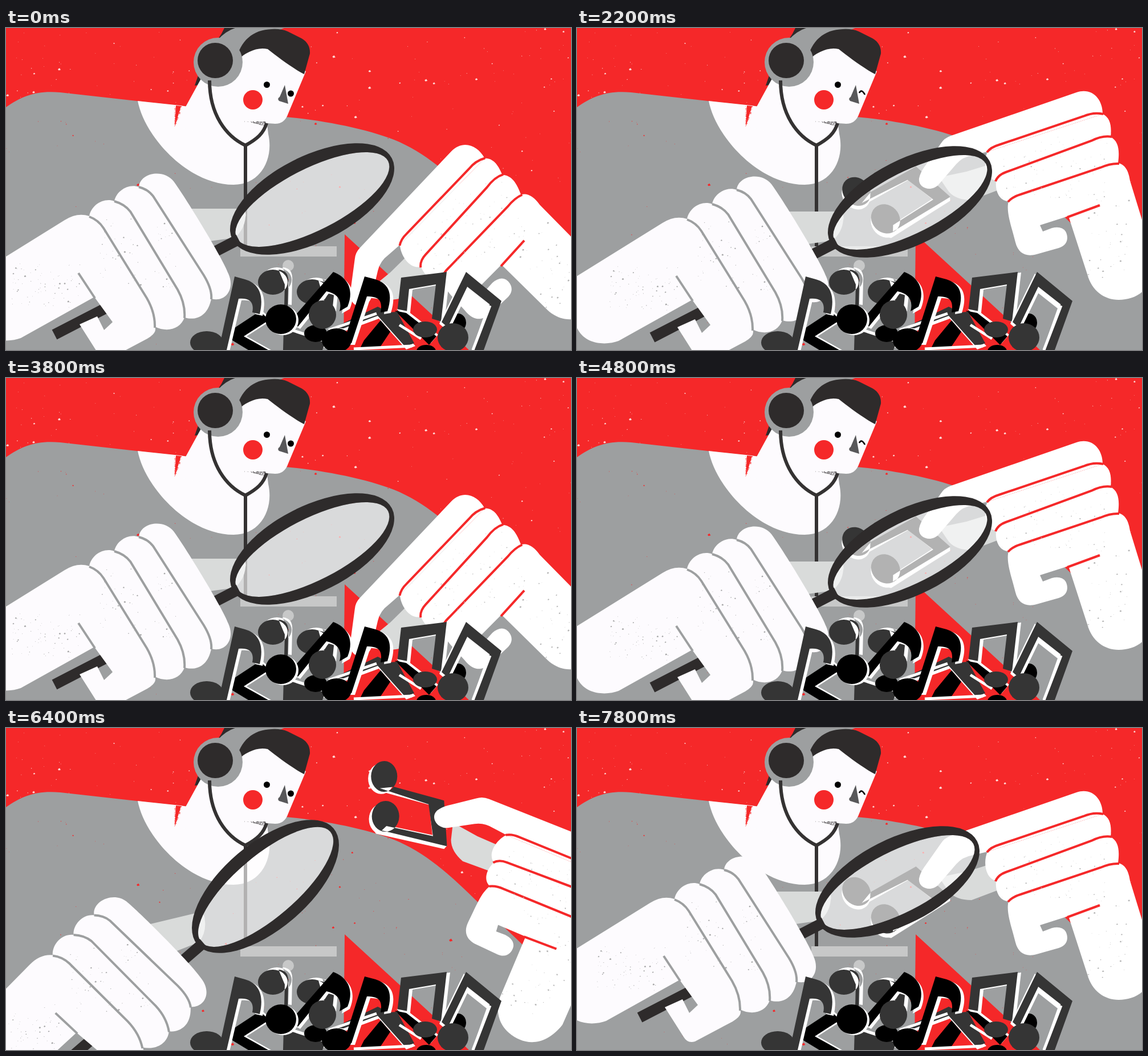
These frames come from a looping animation (991 px wide and 565 px high, 8 s). An HTML page:

```html
<!DOCTYPE html>
<html lang="en">
<head>
<meta charset="utf-8">
<title>Sorting the notes</title>
<style>
  html, body { margin: 0; width: 100%; height: 100%; overflow: hidden; background: #f52829; }
  svg { display: block; width: 100vw; height: 100vh; }
</style>
</head>
<body>
<svg viewBox="0 0 991 565" preserveAspectRatio="none">
  <rect width="991" height="565" fill="#f52829"/>
  <g id="bgDust"></g>

  <!-- body -->
  <path fill="#9d9fa0" d="M0 139C28 119 55 109 95 113L310 137L490 156C565 163 640 179 690 200C742 224 780 259 826 304L991 461V565H0Z"/>
  <g id="bodyDust"></g>
  <path fill="#f52829" d="M594 362L757 512L812 565H592Z"/>
  <path fill="#c7c8c8" d="M411 383H580V401H411Z"/>
  <circle cx="495" cy="417" r="10" fill="#c7c8c8"/>

  <!-- neck and head -->
  <path fill="#fdfbfe" d="M231 128C243 190 318 275 399 275C447 275 470 229 460 186L457 160L306 136Z"/>
  <path fill="#f52829" d="M298 136L307 137L296 173Z"/>
  <g id="neckDust"></g>
  <path fill="#2e2b2b" d="M331 101L345 60L378 10L383 0H420L385 75L347 99Z"/>
  <path fill="#fdfbfe" d="M296 173L347 80L400 30L460 30L526 76L495 150Q489 168 472 168L412 164L380 190Z"/>
  <path fill="#9d9fa0" d="M371 21Q386 5 402 0H488L440 20L410 55Z"/>
  <path fill="#2e2b2b" d="M403 58C411 22 433 3 466 2Q482 1 494 6L518 18Q534 27 533 45L523 81C505 72 478 52 459 37C440 33 422 42 403 58Z"/>
  <circle cx="372" cy="60" r="43" fill="#9d9fa0"/>
  <circle cx="367" cy="57" r="31" fill="#2e2b2b"/>
  <g id="chinDust"></g>
  <circle cx="433" cy="126" r="17" fill="#f52829"/>
  <circle cx="457.500" cy="99.500" r="5.500"/>
  <path fill="#58585a" d="M489 100L495 133L479 128Q475 124 480 121Z"/>
  <circle id="eye" cx="499.500" cy="115" r="5.500"/>
  <path id="wink" d="M495 114Q499 106 505 117" fill="none" stroke="#000" stroke-width="2.500"/>
  <path fill="none" stroke="#343232" stroke-width="6" d="M357 92C357 152 386 190 420 206C440 195 452 185 457 167M420 205V383"/>

  <!-- right hand with its note -->
  <g id="hand">
    <g id="note"></g>
    <path fill="#d9dbda" d="M635 262L683 252L722 240L745 282L692 302Q665 302 652 287Z"/>
    <path fill="#fff" d="M720 217C712 235 716 264 735 268C733 291 744 304 757 304C752 322 762 348 769 376C774 396 788 402 806 397L845 386C862 381 862 366 857 357Q850 347 833 351L817 357L812 346L862 330L895 432C903 462 926 477 950 477C985 477 1014 455 1012 405L970 268Q966 240 949 237C952 214 950 199 936 191C938 171 935 157 922 151Z"/>
    <path fill="#fff" d="M634 275C622 288 598 282 600 264Q602 253 612 240L638 203Q644 193 656 189L876 113C903 104 922 124 922 151L720 217L695 223Q676 226 665 239Z"/>
    <g fill="none" stroke="#f52829" stroke-width="4">
      <path d="M719 218Q726 209 740 205L888 155Q906 147 923 151"/>
      <path d="M734 269Q738 258 752 253L902 198Q922 188 938 191"/>
      <path d="M756 305Q764 296 778 292L918 245Q936 237 951 238"/>
      <path d="M860 332L917 311"/>
    </g>
    <g id="handDust"></g>
  </g>

  <!-- magnifier and left hand -->
  <g id="mag">
    <path fill="#d9dbda" d="M322 317H414Q423 323 420 332Q418 354 401 368L358 374Z"/>
    <ellipse cx="537" cy="301" rx="149" ry="54" transform="rotate(-27 537 301)" fill="#fff" opacity=".62"/>
    <path d="M85 538L408 371" stroke="#2e2b2b" stroke-width="19"/>
    <path id="ring" fill="#2e2b2b" fill-rule="evenodd" transform="rotate(-27 537 300)"/>
    <path fill="#fdfbfe" d="M103 337L-50 432C-76 450 -60 500 -45 525C-30 551 5 552 26 544L155 472L187 516L172 530L160 506L129 520L162 572Q169 584 182 580L248 545Q266 534 261 524C283 535 306 528 313 508C337 515 355 502 360 475C386 482 402 457 390 431C380 403 312 293 294 269C276 246 235 254 233 279C215 272 193 286 190 304C172 297 150 310 146 330Q125 323 103 337Z"/>
    <g fill="none" stroke="#9d9fa0" stroke-width="4">
      <path d="M146 331Q162 337 171 351L247 474Q262 500 261 526"/>
      <path d="M190 304Q208 309 218 322L301 459Q315 484 313 509"/>
      <path d="M233 279Q249 283 258 295L347 434Q362 459 360 476"/>
      <path d="M127 430L156 474"/>
    </g>
    <g id="fistDust"></g>
  </g>

  <g id="pile"></g>
</svg>
<script>
const $ = id => document.getElementById(id);
const INK = '#353535', BLACK = '#000';

// Seeded specks inside a box
function dust(id, seed, n, color, [x, y, w, h], max, keep = () => true) {
  const rnd = () => (seed = (seed * 16807) % 2147483647) / 2147483647;
  let d = '';
  for (let i = 0; i < n; i++) {
    const u = rnd(), v = rnd(), r = 0.4 + max * rnd() ** 5;
    if (keep(u, v)) d += `M${(x + u * w).toFixed(1)} ${(y + v * h).toFixed(1)}l${(r * 1.5).toFixed(1)} ${(-r).toFixed(1)}l${r.toFixed(1)} ${(r * 1.6).toFixed(1)}l${(-r * 1.8).toFixed(1)} ${(r * .5).toFixed(1)}z`;
  }
  $(id).innerHTML += `<path fill="${color}" d="${d}"/>`;
}
dust('bgDust', 41, 240, '#ffd9d6', [0, 0, 991, 300], 1.8);
dust('bodyDust', 77, 110, '#f52829', [0, 160, 800, 400], 2.2);
dust('neckDust', 13, 190, '#f52829', [295, 137, 12, 36], .5, (u, v) => u + v < 1.1);
dust('chinDust', 29, 500, '#4a4849', [414, 164, 42, 11], .5, (u, v) => v < u * u);
dust('handDust', 53, 70, '#b5b5b5', [745, 190, 190, 110], 1);
dust('handDust', 91, 40, '#b5b5b5', [895, 290, 80, 150], 1.2);
dust('fistDust', 67, 70, '#a5a5a6', [10, 410, 120, 80], 1.2);
dust('fistDust', 19, 60, '#a5a5a6', [165, 335, 140, 120], 1.2);

// Ellipse as path data
const oval = (x, y, rx, ry = rx) =>
  `M${x - rx} ${y}a${rx} ${ry} 0 1 0 ${2 * rx} 0a${rx} ${ry} 0 1 0 ${-2 * rx} 0Z`;

// Dark shape, over a shifted white copy when an offset is given
const inked = (d, color = INK, dx = 0, dy = 0) =>
  (dx || dy ? `<path d="${d}" fill="#fff" transform="translate(${dx} ${dy})"/>` : '') +
  `<path d="${d}" fill="${color}"/>`;

const lines = d => `<path d="${d}" fill="none" stroke="#fff" stroke-width="5"/>`;

$('ring').setAttribute('d', oval(537, 300, 157, 75) + oval(537, 301, 149, 54));

$('note').innerHTML =
  `<path fill="#fff" d="${oval(657, 91, 23, 27)}${oval(660, 162, 23, 27)}M638 103L655 113L742 135L749 188L655 170L641 175L650 188L770 212L775 206L740 130Z"/>` +
  inked(`${oval(662, 87, 23, 27)}${oval(666, 157, 24, 27)}M655 108L680 105L768 127L775 207L660 182L668 174L750 190L741 134Z`);

$('pile').innerHTML = [
  // back row
  inked(oval(468, 446, 26, 22) + 'M478 424Q497 425 495 448L494 490L488 489L489 450Z', INK, 7, -4),
  inked(oval(537, 463, 27, 22) + 'M548 443Q576 449 575 470L572 500L564 498Z', INK, 7, -3),
  inked('M693 438L773 428L763 515L747 510L754 450L707 458L702 508L686 500Z', INK, 6, 1),
  inked(oval(793, 517, 14, 16), BLACK),
  // middle tangle
  inked('M398 528L445 497L462 512L417 541L460 565H425L392 545Z', BLACK, 5, 0),
  inked('M487 528L560 552L555 565H486Z', INK, 4, -4),
  inked(oval(543, 536, 20, 15), BLACK),
  inked('M575 526L652 489L662 494L716 553L700 559L652 505L592 527Z', INK, 2, 5),
  inked('M682 496L702 500L755 541L742 556Z', BLACK, 3, -3),
  inked('M628 548L657 513L674 533L656 560H622Z', BLACK),
  inked('M655 500L686 498L716 553L700 558Z'),
  lines('M566 530L650 501M690 521L728 545M610 563L712 558'),
  inked(oval(735, 529, 21, 14)),
  inked(oval(737, 567, 17, 11), BLACK),
  // front notes
  inked('M401 436L419 441C447 449 452 473 445 502L432 499C436 480 426 473 408 475L387 565H373Z', INK, 5, 3),
  inked(oval(352, 552, 29, 20)),
  inked('M574 428C600 438 611 460 599 489L585 497C590 478 582 466 562 462L512 524L497 516Z', BLACK, 4, 4),
  inked(oval(482, 511, 27, 26), BLACK, 4, 2),
  inked(oval(555, 503, 24, 25)),
  inked('M629 436L648 441C676 450 677 472 669 497L657 499C661 478 654 471 633 471L606 553L592 553Z', BLACK, 6, 3),
  inked(oval(580, 548, 26, 21), BLACK),
  inked('M807 428L869 479L838 565H820L847 489L809 459L778 528L764 516Z', INK, -4, 3),
  lines('M847 487L810 458L780 520M849 487L819 565'),
  inked(oval(784, 543, 27, 25))
].join('');

const REST = [0, 0, 0], A = [25, -30, 0], B = [47, 5, 0], C = [69, 40, 0];
const DIG = [690, 381, -27.5], SHOW = [719, 217, 0];

// start ms, hand [x, y, angle], magnifier [dx, dy, angle], note held, winking
const poses = [
  [0, DIG, REST],
  [200, [684, 394, -30], REST],
  [400, DIG, REST],
  [600, [714, 342, -20], REST, 1],
  [800, [735, 293, -12.5], REST, 1],
  [1000, SHOW, A, 1, 1],
  [1400, SHOW, B, 1, 1],
  [1800, SHOW, C, 1, 1],
  [2200, SHOW, B, 1, 1],
  [2600, SHOW, A, 1, 1],
  [3000, [877, 187, 40.8], [-82, -22, -13.5], 1],
  [3100, [975, 150, 52], [-82, -22, -13.5], 1],
  [3200, [873, 200, 30], [-50, -13, -8]],
  [3300, [770, 300, -5], [-20, -5, -3]]
];
const CYCLE = 3400, LOOP = 8000;

function draw(ms) {
  const t = (ms % LOOP) % CYCLE;
  const [, [x, y, a], [dx, dy, r], held, wink] = poses.filter(p => p[0] <= t).pop();
  $('hand').setAttribute('transform', `translate(${x} ${y}) rotate(${a}) translate(-719 -217)`);
  $('mag').setAttribute('transform', `translate(${dx} ${dy}) rotate(${r} 537 300)`);
  const grip = a > 20 ? 'translate(715 220) rotate(-39.5)' : 'translate(710 212) rotate(-43.5)';
  $('note').setAttribute('transform', `${grip} translate(-873 -184)`);
  $('note').style.display = held ? '' : 'none';
  $('eye').style.display = wink ? 'none' : '';
  $('wink').style.display = wink ? '' : 'none';
}

const start = performance.now();
function tick() {
  draw(performance.now() - start);
  requestAnimationFrame(tick);
}
tick();
</script>
</body>
</html>
```
